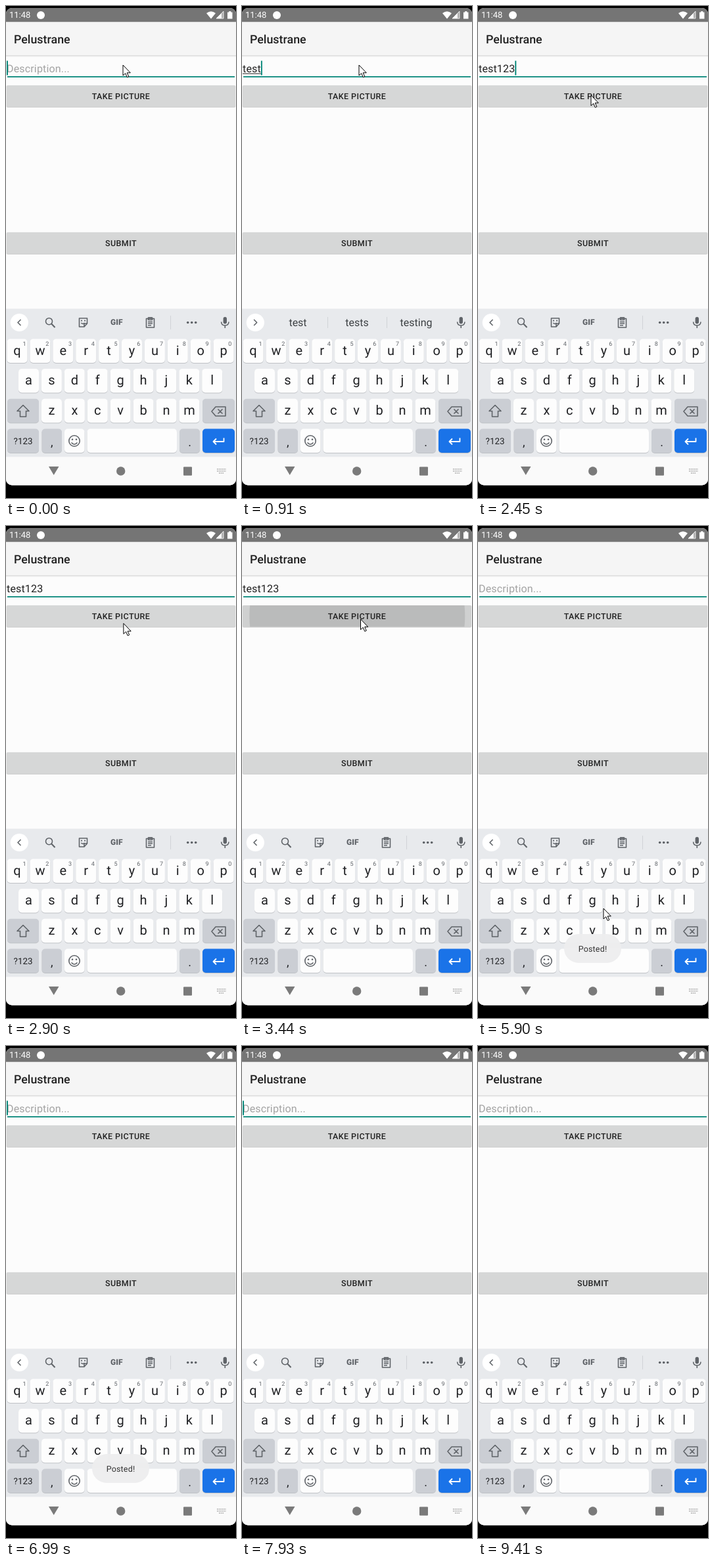
Recreate the animation shown at these times as an HTML page. Size 350x750 px, loop 9690 ms.

```html
<!DOCTYPE html>
<html lang="en">
<head>
<meta charset="utf-8">
<title>Post form</title>
<style>
  html, body { margin: 0; width: 100%; height: 100%; overflow: hidden; background: #000; }
  svg { display: block; width: 350px; height: 750px; font-family: Roboto, sans-serif; text-rendering: geometricPrecision; }
  .field { font-size: 16.04px; letter-spacing: .15px; }
  .button { font-size: 12.48px; font-weight: 500; fill: #212121; }
  .mid { text-anchor: middle; }
  .line { fill: none; stroke: #5f6368; stroke-width: 1.6; stroke-linejoin: round; }
</style>
</head>
<body>
<svg viewBox="0 0 350 750">
  <defs>
    <clipPath id="screen"><rect y="3" width="350" height="727.5" rx="9"/></clipPath>
    <clipPath id="takeClip"><rect x="1" y="121" width="348" height="32.5" rx="2"/></clipPath>
    <clipPath id="submitClip"><rect x="1" y="345" width="348" height="32.5" rx="2"/></clipPath>
    <linearGradient id="shade" x2="0" y2="1">
      <stop stop-color="#d8d8d8"/><stop offset="1" stop-color="#fcfcfc"/>
    </linearGradient>
  </defs>
  <g clip-path="url(#screen)">
    <path fill="#fcfcfc" d="M0 0H350V750H0Z"/>
    <path fill="#757575" d="M0 0H350V24.4H0Z"/>
    <path fill="#f5f5f5" d="M0 24.4H350V75H0Z"/>
    <rect y="75" width="350" height="3" fill="url(#shade)"/>

    <!-- status bar -->
    <g fill="#fff">
      <text x="5" y="18.4" font-size="13">11:48</text>
      <circle cx="53" cy="14" r="6"/>
      <path d="M305 11Q312 5.5 319 11L312 19.5Z"/>
      <path d="M331 8V19H320Z" opacity=".4"/>
      <path d="M328 11V19H320Z"/>
      <path d="M331 8V19H320Z" fill="none" stroke="#fff" stroke-width=".8"/>
      <path d="M337 9.5H339.3V8H342.3V9.5H344.5V19.5H337Z"/>
    </g>
    <text x="12" y="57" font-size="17.83" font-weight="500" fill="#212121">Pelustrane</text>

    <!-- form -->
    <text id="hint" class="field" x="1" y="101.3" fill="#a3a3a3">Description...</text>
    <text id="typed" class="field" x="1" y="101.3" fill="#212121"></text>
    <rect id="composing" x="1" y="102.6" height="1" fill="#212121"/>
    <path fill="#008577" d="M2 107H348V108.8H2Z"/>
    <rect id="caret" y="83.5" width="1.9" height="22" fill="#008577"/>
    <g id="buttons"></g>

    <!-- keyboard -->
    <path fill="#e8eaed" d="M0 461.5H350V687.5H0Z"/>
    <circle cx="20.3" cy="482.5" r="13.6" fill="#fff"/>
    <path id="chevron" class="line" d="M22.5 478L18 482.5L22.5 487"/>
    <g id="tools">
      <g class="line">
        <circle cx="65.5" cy="480.7" r="5"/><path stroke-width="2" d="M69 484.3L74.5 490"/>
        <path d="M111.5 476H123.5V484L119 489H111.5Z M123.5 484H119V489 M114.5 483Q117 486 119.5 483"/>
        <path d="M114 479.6H116 M119 479.6H121"/>
        <path d="M213.5 476.5H225.5V490H213.5Z M216.5 475V478.5H222.5V475Z M216 481.5H223 M216 484H223 M216 486.7H221"/>
      </g>
      <text class="mid" x="168.3" y="486.3" font-size="12" font-weight="900" fill="#5f6368">GIF</text>
      <path stroke="#d0d3d7" d="M250.5 472V493"/>
      <g fill="#5f6368"><circle cx="276.7" cy="482.5" r="1.8"/><circle cx="282.7" cy="482.5" r="1.8"/><circle cx="288.7" cy="482.5" r="1.8"/></g>
    </g>
    <g id="words" class="mid" font-size="16" fill="#3c4043">
      <path stroke="#d0d3d7" d="M130.5 474V491M220.5 474V491"/>
      <text x="85" y="488"></text><text x="175" y="488"></text><text x="265" y="488"></text>
    </g>
    <rect x="330.6" y="474" width="5.4" height="10.5" rx="2.7" fill="#5f6368"/>
    <path class="line" d="M327.6 481.5Q327.9 487 333.3 487T339 481.5M333.3 487V491"/>
    <g id="keys" class="mid" fill="#202124"></g>
    <g class="line" stroke-width="1.5">
      <path d="M26 608.5L35 617.5H30.5V626H21.5V617.5H17Z"/>
      <path d="M319 611H334V625H319L313 618Z M322.5 614.5L329.5 621.5M329.5 614.5L322.5 621.5"/>
      <circle cx="104" cy="663" r="8.2"/><path d="M99.5 665.5Q104 671 108.5 665.5"/>
      <path stroke="#fff" stroke-width="1.8" d="M331.5 658.5V664H316M320 659.5L315.5 664L320 668.5"/>
    </g>
    <g fill="#5f6368"><circle cx="101" cy="660.7" r="1.3"/><circle cx="107" cy="660.7" r="1.3"/></g>

    <!-- navigation bar -->
    <path fill="#fafafa" d="M0 687.5H350V750H0Z"/>
    <g fill="#7a7a7a">
      <path d="M65 702H80.5L72.7 715Z"/>
      <circle cx="174.7" cy="709" r="6.7"/>
      <rect x="270" y="702.5" width="13" height="13.3" rx="1"/>
      <path fill="none" stroke="#a8a8a8" stroke-width="1.5" stroke-dasharray="1.7 1" d="M321 706H335M321 709H335M324 712H332"/>
    </g>

    <g id="toast">
      <rect x="131" y="622" width="87" height="44" rx="22" fill="#eeeeef" opacity=".97"/>
      <text class="mid" x="174.5" y="648.6" font-size="12.48" letter-spacing=".2" fill="#333">Posted!</text>
    </g>
  </g>
  <path id="mouse" fill="#fff" stroke="#000" stroke-linejoin="round" d="M0 0V16L3.7 12.6L6.3 18.6L8.8 17.5L6.2 11.8H11.3Z"/>
</svg>
<script>
const $ = id => document.getElementById(id);
const clamp = v => Math.max(0, Math.min(1, v));
const show = (el, on) => el.style.display = on ? '' : 'none';
const latest = (rows, t) => rows.filter(row => row[0] <= t).pop();

function addButton(id, label, y) {
  $('buttons').innerHTML += `
    <rect x=".3" y="${y - .3}" width="349.4" height="34" rx="2.5" fill="#000" opacity=".07"/>
    <rect x="1" y="${y + .6}" width="348" height="33.2" rx="2" fill="#000" opacity=".12"/>
    <rect x="1" y="${y}" width="348" height="32.5" rx="2" fill="#d6d7d7"/>
    <g id="${id}" clip-path="url(#${id}Clip)">
      <rect x="1" y="${y}" width="348" height="32.5" opacity=".25"/><circle cx="175.3" cy="${y + 16}"/>
    </g>
    <text class="button mid" letter-spacing=".0357em" x="175" y="${y + 21}">${label}</text>`;
}
addButton('take', 'TAKE PICTURE', 121);
addButton('submit', 'SUBMIT', 345);

function addKey(x, y, w, label = '', fill = '#fdfdfd', size = 20, dy = 24) {
  $('keys').innerHTML += `
    <rect x="${x}" y="${y + 1}" width="${w}" height="36.5" rx="5" fill="#bfc2c6"/>
    <rect x="${x}" y="${y}" width="${w}" height="36.5" rx="5" fill="${fill}"/>
    <text x="${x + w / 2}" y="${y + dy}" font-size="${size}">${label}</text>`;
}
const pitch = 34.9, grey = '#cbced4';
[['qwertyuiop', 1.5, 507.5], ['asdfghjkl', 19, 553], ['zxcvbnm', 54, 598.7]].forEach(([letters, x, y]) =>
  [...letters].forEach((letter, i) => addKey(x + i * pitch, y, 31, letter)));
for (let i = 0; i < 10; i++)
  $('keys').innerHTML += `<text x="${28 + i * pitch * .996}" y="517.7" font-size="9" fill="#5f6368">${(i + 1) % 10}</text>`;
addKey(2, 598.7, 48, '', grey);
addKey(299, 598.7, 49, '', grey);
addKey(2, 644.5, 48, '?123', grey, 13.4, 23.5);
addKey(54.5, 644.5, 30.5, ',', grey, 18, 26);
addKey(89, 644.5, 30.5);
addKey(123.5, 644.5, 136.5);
addKey(264, 644.5, 31, '.', grey, 18, 26);
addKey(299, 644.5, 49, '', '#1a73e8');

const LOOP = 9690, STEP = 90, CLEARED = 5180;
const stepStarts = [[0], [460], [1650], [2450], [4820], [6990]];
const blinks = [180, 460, 1370, 1650, 2540, 2990, 3440, 3980, 4450, 4910, 5450, 5990, 6530, 6990, 7500, 7930, 8480, 8920, 9410];
const typing = [[0, ''], [460, 't'], [550, 'te'], [640, 'tes'], [730, 'test'],
  [1650, 'test1'], [1740, 'test12'], [1830, 'test123'], [CLEARED, '']];
const suggestions = [[460, 'to', 'the', 'that'], [640, 'tea', 'yes', 'test'], [910, 'test', 'tests', 'testing'],
  [1650, '', 'test1', ''], [1740, '', 'test12', ''], [1830, '', 'test123', '']];
const mousePath = [[0, 178, 90], [2449, 178, 90], [2450, 172, 136], [2720, 178, 152], [3170, 180.5, 142],
  [3440, 180.5, 142], [3980, 177, 362], [5090, 177, 362], [5360, 198, 392], [5900, 191, 583], [6260, 207, 638]];

function mouseAt(t) {
  const i = mousePath.findIndex(p => p[0] > t);
  if (i < 0) return mousePath.at(-1).slice(1);
  const a = mousePath[i - 1], b = mousePath[i];
  const k = (t - a[0]) / (b[0] - a[0]), eased = k * k * (3 - 2 * k);
  return [1, 2].map(n => a[n] + (b[n] - a[n]) * eased);
}

function ripple(id, age) {
  const group = $(id);
  show(group, age >= 0 && age < 450);
  group.lastElementChild.setAttribute('r', 110 + 54 * Math.max(0, age) / 90);
  group.setAttribute('opacity', .13 * clamp(.5 + age / 180) * clamp((450 - age) / 270));
}

function draw(t) {
  const start = latest(stepStarts, t)[0];
  const held = start + Math.floor((t - start) / STEP) * STEP;

  const text = latest(typing, t)[1];
  $('typed').textContent = text;
  show($('hint'), !text);
  const width = text ? $('typed').getComputedTextLength() : 0;
  $('caret').setAttribute('x', 1 + width);
  show($('caret'), blinks.filter(b => b <= t).length % 2 === 0);

  const suggesting = t >= 460 && t < 2010;
  show($('words'), suggesting);
  show($('tools'), !suggesting);
  show($('composing'), suggesting);
  $('composing').setAttribute('width', width);
  $('chevron').setAttribute('transform', suggesting ? 'rotate(180 20.3 482.5)' : '');
  if (suggesting) {
    const words = latest(suggestions, t);
    $('words').querySelectorAll('text').forEach((el, i) => el.textContent = words[i + 1]);
  }

  ripple('take', held - 3350);
  ripple('submit', held - 4820);
  $('toast').setAttribute('opacity', Math.min(clamp((held - CLEARED + STEP) / 360), clamp((7500 - held) / 510)));
  $('mouse').setAttribute('transform', `translate(${mouseAt(held)})`);
  show($('mouse'), t < 6620);
}

const begin = performance.now();
function tick() {
  draw((performance.now() - begin) % LOOP);
  requestAnimationFrame(tick);
}
tick();
</script>
</body>
</html>
```
